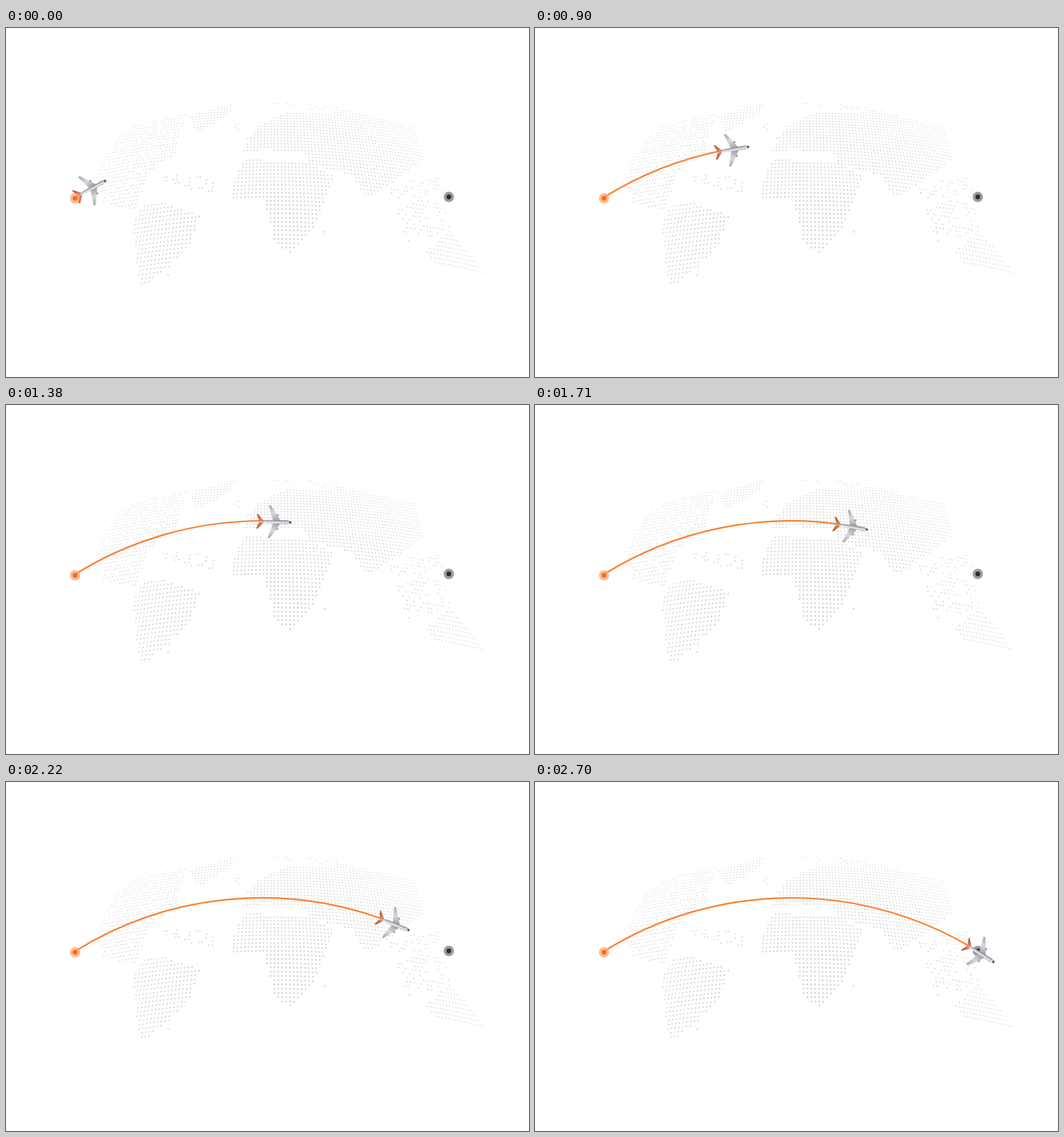
An HTML page with a canvas for the animation above (2.73 s loop, 750 by 500 pixels).

```html
<!DOCTYPE html>
<html lang="en">
<head>
<meta charset="utf-8">
<title>Flight route</title>
<style>
  html, body { margin: 0; width: 100%; height: 100%; overflow: hidden; background: #fff; }
  canvas { display: block; }
</style>
</head>
<body>
<canvas id="stage" width="750" height="500"></canvas>
<script>
const LOOP = 2730, STEP = 30, TAU = Math.PI * 2;
const stage = document.getElementById('stage');
const ctx = stage.getContext('2d');
const map = stage.cloneNode();

// Rough coastlines; the lattice of dots gives them their ragged edge.
const mainland = new Path2D(
  'M343 187L438 195 470 212 438 294 407 322 387 312 371 247 320 243 330 211Z' + // Africa
  'M338 178L362 140 400 122 500 121 585 141 600 188 550 224 518 245 494 210 438 196 428 180 372 174Z' + // Eurasia
  'M262 126L328 107 322 122 274 151Z' + // Greenland
  'M198 251L224 249 278 269 261 315 203 367 191 367 181 280Z' + // South America
  'M637 288L688 353 618 338 601 323Z'); // Australia
const broken = new Path2D('M160 158L185 138 262 121 248 152 245 178 201 208 188 262 140 251 128 208Z'); // North America
const islands = new Path2D(
  'M375 107L435 107 514 122 446 118Z' + // Arctic
  'M224 211L298 213 298 238 224 224Z' + // Atlantic
  'M316 134L349 140 350 165Z' + // Iceland, Britain
  'M549 224L622 212 640 290 576 310Z' + // Indonesia
  'M452 285L463 281 455 306ZM234 339L252 353 222 360Z'); // Madagascar, Falklands
const regions = [[mainland, 1], [broken, .82], [islands, .42]];

let seed = 7;
const random = () => (seed = seed * 16807 % 2147483647) / 2147483647;

function disc(c, x, y, r, color) {
  c.fillStyle = color;
  c.beginPath();
  c.arc(x, y, r, 0, TAU);
  c.fill();
}

// Lattice wrapped on a globe: rows sag and columns close up towards the rim.
function drawMap(c) {
  let row = 108;
  while (row < 370) {
    const south = Math.min(1, (row - 108) / 150);
    const scale = 1 + (row - 250) * (row < 250 ? .0012 : .0007);
    for (let col = -65; col <= 65; col++) {
      const dx = 430 * Math.sin(col * 5.4 / 430) * scale;
      const x = 385 + dx, y = row + .0004 * dx * dx;
      const region = regions.find(([path]) => c.isPointInPath(path, x, y));
      if (!region || random() > region[1]) continue;
      const rim = Math.min(1, (dx / 300) ** 2);
      disc(c, x, y, .75 + .5 * south - .2 * rim, `rgba(205,205,205,${.92 - .5 * rim})`);
    }
    row += 3.4 + 2.7 * south;
  }
}

// The route is the top of a circle.
const route = { x: 367, y: 673.7, r: 507.7 };
const headingAt = x => Math.asin((x - route.x) / route.r);

// Steady cruise that slows towards both ends.
function planeX(t) {
  const d = t - 1380;
  return d < 0 ? 385 + .2125 * d + 8.45e-12 * d ** 4
               : 385 + .208 * d - 7e-12 * d ** 4;
}

function shape(d, fill) {
  ctx.fillStyle = fill;
  ctx.fill(new Path2D(d));
}

function gradient(x0, y0, x1, y1, ...colors) {
  const g = ctx.createLinearGradient(x0, y0, x1, y1);
  colors.forEach((color, i) => g.addColorStop(i / (colors.length - 1), color));
  return g;
}

function drawPlane(heading) {
  ctx.save();
  ctx.translate(route.x + route.r * Math.sin(heading), route.y + 1.2 - route.r * Math.cos(heading));
  ctx.rotate(heading);
  const wing = gradient(0, 1, -7, 23, '#a2a2aa', '#d9d9de', '#a9a9b0');
  const fin = gradient(-17, 2, -23, 8, '#a39a9c', '#d4582f');
  for (const side of [-1, 1]) {
    ctx.save();
    ctx.scale(1, side);
    disc(ctx, 4, 10, 1.5, '#8a8a92');
    shape('M9 1Q3 11 -6 23.5L-9 23.5 -2 1Z', wing);
    shape('M-15 1L-24 10.5 -26 10.5 -22 1Z', fin);
    ctx.restore();
  }
  shape('M-23 0L-12 -2.4 18 -2.8Q31 0 18 2.8L-12 2Z',
    gradient(0, -3, 0, 3, '#77777f', '#b5b5bc', '#f3f3f5', '#8b8b93'));
  disc(ctx, 22.5, 0, 1.7, '#55545b');
  ctx.restore();
}

function marker(x, y, halo, core) {
  disc(ctx, x, y, 7.4, halo);
  disc(ctx, x, y, 3.4, core);
}

function draw(t) {
  const x = planeX(t);
  ctx.clearRect(0, 0, 750, 500);
  ctx.drawImage(map, 0, 0);
  marker(635, 242, '#9c9c9c', '#2d2d2d');
  drawPlane(headingAt(x));
  ctx.strokeStyle = '#fb7f2d';
  ctx.lineWidth = 2.2;
  ctx.beginPath();
  ctx.arc(route.x, route.y, route.r, headingAt(99) - TAU / 4, headingAt(x - 15) - TAU / 4);
  ctx.stroke();
  marker(99, 244, 'rgba(255,160,120,.72)', '#ff6d05');
}

drawMap(map.getContext('2d'));

function tick() {
  const t = performance.now() % LOOP;
  draw(Math.floor(t / STEP) * STEP);
  requestAnimationFrame(tick);
}
tick();
</script>
</body>
</html>
```
